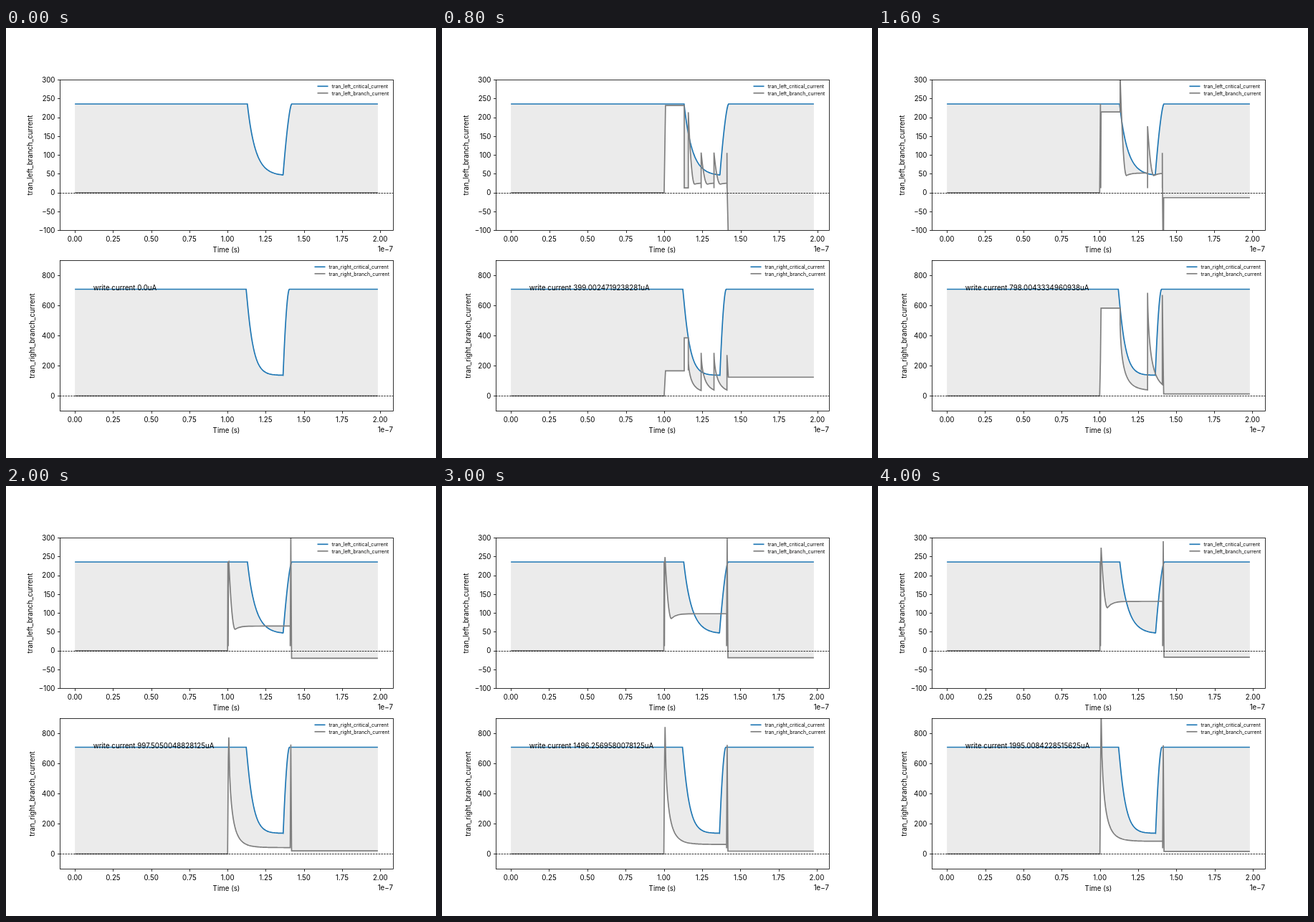
Recreate the animation shown at these times as an HTML page with a canvas. Size 600 by 600 pixels, loop 4100 ms.

```html
<!DOCTYPE html>
<html>
<head>
<meta charset="utf-8">
<style>
html, body { margin: 0; width: 100%; height: 100%; overflow: hidden; background: #fff; }
canvas { display: block; }
</style>
</head>
<body>
<canvas id="stage" width="600" height="600"></canvas>
<script>
const ctx = document.getElementById('stage').getContext('2d');
const BLUE = '#1f77b4', GRAY = '#7f7f7f', FILL = '#ebebeb';
const STEP = 100, STEPS = 41, END = 1.41;

// step, write current (uA), last time, left and right peaks when both sides are resistive
const KEYS = [
  [0, 0, 1.985, 236, 740],
  [8, 399.00247, 1.977, 236, 740],
  [12, 598.50372, 1.982, 236, 740],
  [20, 997.505, 1.984, 237, 775],
  [27, 1346.6311, 1.98, 258, 812],
  [34, 1695.75806, 1.982, 237, 885],
  [40, 1995.0084, 1.98, 274, 940]
];

const panels = [
  { side: 'left', top: 72, max: 300, scale: 0.525, ticks: [-100, 50], labelX: 37, legendX: 434.5 },
  { side: 'right', top: 324, max: 900, scale: 0.21, ticks: [0, 200], labelX: 40, legendX: 430.5 }
];

function settings(k) {
  const i = Math.max(1, KEYS.findIndex(key => key[0] >= k));
  const a = KEYS[i - 1], b = KEYS[i], f = (k - a[0]) / (b[0] - a[0]);
  return a.map((v, j) => v + (b[j] - v) * f);
}

// add n samples of fn(t, s) between two times, s running from 0 to 1
function sample(points, from, to, n, fn) {
  for (let i = 0; i <= n; i++) {
    const t = from + (to - from) * i / n;
    points.push([t, fn(t, i / n)]);
  }
}

function critical(side, tmax) {
  const left = side === 'left';
  const [high, low, fall, back, power] = left ? [236, 48, 1.13, 1.42, 1.5] : [709, 137, 1.122, 1.405, 1.8];
  const points = [[0, high]];
  sample(points, fall, 1.362, 40, t => left
    ? 45 + 191 * Math.exp((fall - t) / 0.053)
    : 137 + 572 * Math.exp(-(((t - fall) / 0.0422) ** 1.1)));
  sample(points, 1.364, back, 12, (t, s) => low + (high - low) * (1 - (1 - s) ** power));
  points.push([tmax, high]);
  return points;
}

const leftCrossing = v => 1.13 - 0.053 * Math.log(Math.min(1, (v - 45) / 191));
const rightCrossing = v => 1.122 + 0.0422 * (-Math.log((v - 137) / 572)) ** (1 / 1.1);

// both sides resistive: left falls to a dip and recovers, right decays
function relax(left, right, k, from, to, leftPeak, rightPeak, tau) {
  const settled = 3.28 * k, dip = settled * 0.87, turn = Math.min(from + 0.041, to);
  sample(left, from, turn, 12, t => dip + (leftPeak - dip) * (1 - (t - from) / 0.041) ** 2);
  if (turn < to) sample(left, turn, to, 16, t => settled - (settled - dip) * Math.exp((turn - t) / 0.03));
  sample(right, from, to, 70, t => 2.1 * k + (rightPeak - 2.1 * k) * Math.exp(-(((t - from) / tau) ** 0.706)));
}

function branches(k) {
  const [, current, tmax, leftPeak, rightPeak] = settings(k);
  const left = [[0, 0], [1, 0]], right = [[0, 0], [1, 0]];
  const both = (t, a, b) => { left.push([t, a]); right.push([t, b]); };
  let rest = 0;

  if (k >= 17) {
    left.push([1.002, 236], [1.004, 12], [1.006, 236]);
    right.push([1.003, 400], [1.005, 640]);
    relax(left, right, k, 1.008, END, leftPeak, rightPeak, 0.0192);
    both(END, 12, 38);
    both(1.414, 320 - 0.72 * k, 732 - 0.25 * k);
    rest = 0.15 * k - 23;
  } else if (k > 0) {
    let plateau = 0.5815 * current;
    if (k >= 9) {
      plateau = 99 + 0.58 * (current - 598.5);
      left.push([1.005, 236], [1.007, 12]);
      right.push([1.005, 0.4 * (current - plateau)]);
    }
    both(1.009, plateau, current - plateau);
    let burst = k >= 9 ? rightCrossing(current - plateau) : Infinity;
    if (k > 1 && k < 9) {
      const drop = leftCrossing(plateau);
      both(drop, plateau, current - plateau);
      plateau = 13;
      both(drop, plateau, current - plateau);
      if (k > 3) burst = Math.max(drop, rightCrossing(current - plateau));
    }
    both(Math.min(burst, END), plateau, current - plateau);
    if (burst < END) {
      const period = 0.0838 * (k / 8) ** 1.1;
      let leftTop = 118 + 12 * k, rightTop = 30 * k;
      right.push([burst, current - leftTop - 15]);
      for (let t = burst; t < 1.39; t += period) {
        const next = t + period < 1.39 ? t + period : END;
        relax(left, right, k, t, next, leftTop, rightTop, 0.0234);
        left.push([next, 12]);
        leftTop = 37 + 8.75 * k;
        rightTop = current - 113;
      }
      both(END, 106, current - 127);
      left.push([1.411, 12]);
      rest = 107 - 0.58 * current;
      if (rest < -236) {
        left.push([1.417, -236]);
        right.push([1.417, 130]);
        rest = -13;
      }
    } else if (k > 1) {
      rest = 13 - 0.58 * current;
    }
  }
  both(1.419, rest, -rest);
  both(tmax, rest, -rest);
  return { left, right, current, tmax };
}

function text(str, x, y, align = 'left', size = 9.72) {
  ctx.font = size + 'px Inter, sans-serif';
  ctx.textAlign = align;
  ctx.fillStyle = '#000';
  ctx.fillText(str, x, y);
}

function line(points, color, width) {
  ctx.beginPath();
  points.forEach(p => ctx.lineTo(...p));
  ctx.strokeStyle = color;
  ctx.lineWidth = width;
  ctx.stroke();
}

function drawPanel(panel, state) {
  const { side, top, max, scale, ticks, labelX, legendX } = panel;
  const bottom = top + 210, name = `tran_${side}_`;
  const px = t => 96.14 + t * 422.73 / state.tmax;
  const py = v => top + (max - v) * scale;
  const toPixels = points => points.map(([t, v]) => [px(t), py(v) + 0.4]);
  const limit = toPixels(critical(side, state.tmax)), branch = toPixels(state[side]);

  ctx.save();
  ctx.beginPath();
  ctx.rect(75, top, 465, 210);
  ctx.clip();
  ctx.beginPath();
  limit.concat(branch.slice().reverse()).forEach(p => ctx.lineTo(...p));
  ctx.fillStyle = FILL;
  ctx.fill();
  line(limit, BLUE, 1.7);
  line(branch, GRAY, 1.7);
  ctx.setLineDash([2.6, 1.2]);
  const zero = Math.floor(py(0) + 0.5) + 0.5;
  line([[75, zero], [540, zero]], '#000', 0.8);
  ctx.restore();

  ctx.strokeStyle = '#000';
  ctx.lineWidth = 0.8;
  ctx.strokeRect(75.5, top + 0.5, 465, 210);
  for (let t = 0; t <= 2; t += 0.25) {
    const x = Math.round(px(t)) + 0.5;
    line([[x, bottom + 0.5], [x, bottom + 4]], '#000', 0.8);
    text(t.toFixed(2), px(t), bottom + 16, 'center');
  }
  for (let v = ticks[0]; v <= max; v += ticks[1]) {
    const y = Math.round(py(v)) + 0.5;
    line([[72, y], [75.5, y]], '#000', 0.8);
    text(String(v).replace('-', '−'), 68.5, py(v) + 3.8, 'right');
  }
  text('Time (s)', 307.5, bottom + 30.5, 'center');
  text('1e−7', 540, bottom + 30, 'right');

  ctx.save();
  ctx.translate(labelX, top + 105.5);
  ctx.rotate(-Math.PI / 2);
  text(name + 'branch_current', 0, 0, 'center');
  ctx.restore();

  [['critical', BLUE], ['branch', GRAY]].forEach(([kind, color], i) => {
    const y = top + 9.3 + i * 9.5;
    line([[legendX, y], [legendX + 15, y]], color, 1.7);
    text(name + kind + '_current', legendX + 20, y + 2.8, 'left', 6.94);
  });
}

function draw() {
  const k = Math.floor(performance.now() / STEP) % STEPS;
  const state = branches(k);
  ctx.fillStyle = '#fff';
  ctx.fillRect(0, 0, 600, 600);
  panels.forEach(panel => drawPanel(panel, state));
  const amount = k ? String(Math.fround(state.current)) : '0.0';
  text(`write current ${amount}uA`, 121.8, 366);
  requestAnimationFrame(draw);
}
draw();
</script>
</body>
</html>
```
